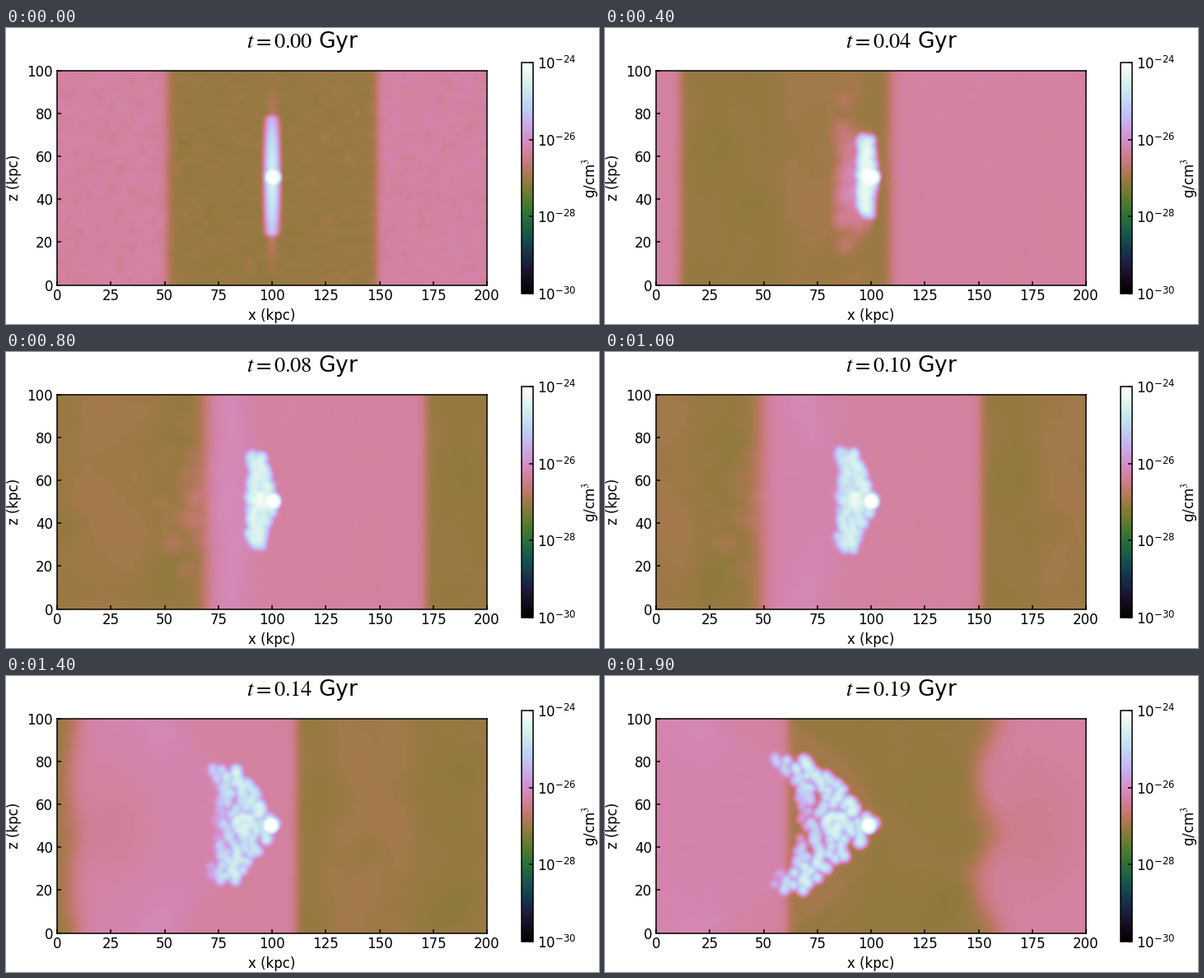
A matplotlib script for the animation above (2000 ms loop, 720 px wide and 360 px high).

```python
import numpy as np
import matplotlib.pyplot as plt
from matplotlib.animation import FuncAnimation
from matplotlib.cm import ScalarMappable
from matplotlib.colors import LogNorm

W, H, DPI = 720, 360, 100
FRAMES, INTERVAL = 20, 100
NX, NZ = 400, 200
WIND = 10  # kpc per frame

plt.rcParams.update({
    "font.family": "DejaVu Sans",
    "font.size": 12,
    "mathtext.fontset": "stix",
    "axes.linewidth": 1.1,
    "xtick.direction": "in",
    "ytick.direction": "in",
    "xtick.major.width": 1.1,
    "ytick.major.width": 1.1,
})

rng = np.random.default_rng(7)
x = (np.arange(NX) + 0.5) * 200 / NX
z = (np.arange(NZ) + 0.5) * 100 / NZ
X, Z = np.meshgrid(x, z)
DZ = Z - 50


def ramp(n, a, b):
    return float(np.clip((n - a) / (b - a), 0, 1))


def step(d):
    return 0.5 * (1 + np.tanh(d / 2))


def bump(d, width):
    return np.exp(-(d / width) ** 2)


def smooth_noise(scale):
    """Periodic random field with unit spread; scale in kpc."""
    fx = np.fft.fftfreq(NX, 200 / NX)
    fz = np.fft.fftfreq(NZ, 100 / NZ)[:, None]
    spectrum = np.fft.fft2(rng.standard_normal((NZ, NX)))
    field = np.fft.ifft2(spectrum * np.exp(-2 * (np.pi * scale) ** 2 * (fx**2 + fz**2))).real
    return field / field.std()


def blobs(px, pz, sigma, amp):
    """Sum of round Gaussians on the grid."""
    ex = np.exp(-((x - px[:, None]) / sigma) ** 2 / 2)
    ez = np.exp(-((z - pz[:, None]) / sigma) ** 2 / 2)
    return (ez * amp[:, None]).T @ ex


fine, coarse = smooth_noise(1.3), smooth_noise(6)

# Disc clumps: q is the signed height, lag the place behind the front
COUNT = 150
index = np.arange(COUNT)
q = (-1.0) ** index * (index * 0.618034 % 1) ** 1.4
lag = (index * 0.754878 + rng.uniform(0, 0.25, COUNT)) % 1
jitter = rng.normal(0, 0.5, (2, COUNT))

# Thin gas stripped early
GAS = 80
gas_z = rng.normal(47, 13, GAS)
gas_speed = rng.uniform(0.3, 1.2, GAS)


def background(n):
    """Log density of the wind: a thin band between dense ones, moving left."""
    shift = -WIND * n * NX // 200
    grain = np.roll(fine, shift, axis=1)
    patch = np.roll(coarse, shift, axis=1)
    u = (X + WIND * n) % 200

    ragged = ramp(n, 12, 19)
    right = 149 - ragged * (5 - 5 * np.cos(4 * np.pi * Z / 100) + patch)
    low = step((u - 51.3) / 1.2) * step((right - u) / (1 + 0.13 * n))

    # warmer zone of the thin band, then the wake behind the bow shock
    away = (X - 132 + 13.3 * n + 100) % 200 - 100
    late = ramp(n, 16, 19)
    window = step((20 - abs(away)) / 2.5) * (0.2 + 0.8 * ramp(n, 0, 4))
    wake = step((102 - 0.016 * DZ**2 - X) / 1.2)
    brown = window * (1 - late) + wake * late
    calm = ramp(n, 0, 3)
    thin = 0.490 - 0.004 * calm + 0.015 * brown + 0.003 * calm * patch

    # bow-shock cone and the lilac front that slides away from the axis
    since = max(n - 5, 0)
    cone = step((100 - 0.11 * since * abs(DZ) - X) / 1.5)
    spread = ramp(n, 8, 12)
    heights = 1 - spread + spread * (DZ / 50) ** 2
    front = heights * bump(X - 98 + 5.5 * since, 8 + 0.7 * since)
    dense = 0.618 + 0.001 * patch + ramp(n, 4, 7) * (0.011 * cone + 0.013 * front)
    dense -= 0.022 * ramp(n, 7, 14) * bump(u - 165, 20) * bump(DZ, 28)

    grain_size = 0.003 * np.exp(-n / 1.5) + 0.0006
    return dense + (thin - dense) * low + grain_size * grain


def clumps(n):
    """The disc swept back into a cone with a ragged rear."""
    h = abs(q)
    half = 17 + 0.9 * max(n - 4, 0)
    trail = min(3.5 + 0.12 * n**2, 33) * (1 - min(0.07 * n, 0.5) * h)
    px = 100.6 - 0.09 * n**2 * h**1.35 - lag * trail + jitter[0]
    pz = 51 + q * half + jitter[1]
    amp = 5e4 * (1 + 0.1 * n) * 10 ** (-1.2 * ramp(n, 8, 14) * lag**4)
    return blobs(px, pz, 1.2, amp * ramp(n, 0, 3))


def disc(n):
    """Smooth gas column of the undisturbed galaxy."""
    edge = (DZ / 28) ** 2
    level = 5.4 - 0.9 * edge - 1.4 * step((abs(DZ - 1) - 28) / 0.5)
    level = level - 0.5 * n * edge - 0.06 * n**2
    return 10**level * np.exp(-((X - 100 + 0.4 * n * edge) / 1.4) ** 2 / 2)


def core(n):
    r = np.hypot(X - 100.4 + 0.15 * max(n - 8, 0), (Z - 50.3) * 0.95)
    return 1.3e6 * np.exp(-(r / 2.8) ** 4)


def tail(n):
    gas = np.full(GAS, 10 ** (3.2 - 0.11 * n) * ramp(n, 0, 2))
    return blobs(99 - gas_speed * n**1.8, gas_z, 2.7, gas)


def density(n):
    """Log density scaled to 0..1 over the colour range."""
    return np.log10(10 ** (6 * background(n)) + disc(n) + clumps(n) + core(n) + tail(n)) / 6


def place(left, top, width, height):
    return [left / W, 1 - (top + height) / H, width / W, height / H]


fig = plt.figure(figsize=(W / DPI, H / DPI), dpi=DPI, facecolor="white")
ax = fig.add_axes(place(62, 52, 522, 260.5))
image = ax.imshow(density(0), cmap="cubehelix", vmin=0, vmax=1, origin="lower",
                  extent=(0, 200, 0, 100), aspect="auto", interpolation="bilinear")
ax.set_xticks(range(0, 201, 25))
ax.set_yticks(range(0, 101, 20))
ax.set_xlabel("x (kpc)")
ax.set_ylabel("z (kpc)", labelpad=4.8)

cax = fig.add_axes(place(626, 42, 14, 281))
bar = fig.colorbar(ScalarMappable(LogNorm(1e-30, 1e-24), "cubehelix"), cax=cax,
                   ticks=[1e-30, 1e-28, 1e-26, 1e-24])
bar.minorticks_off()
bar.set_label("g/cm$^3$")

title = fig.text(0.5, 1 - 23.5 / H, "", fontsize=19, ha="center", va="baseline")


def update(n):
    image.set_data(density(n))
    title.set_text(f"$t={n / 100:.2f}$ Gyr")
    return image, title


anim = FuncAnimation(fig, update, frames=FRAMES, interval=INTERVAL, repeat=True, blit=False)
plt.show()
```
